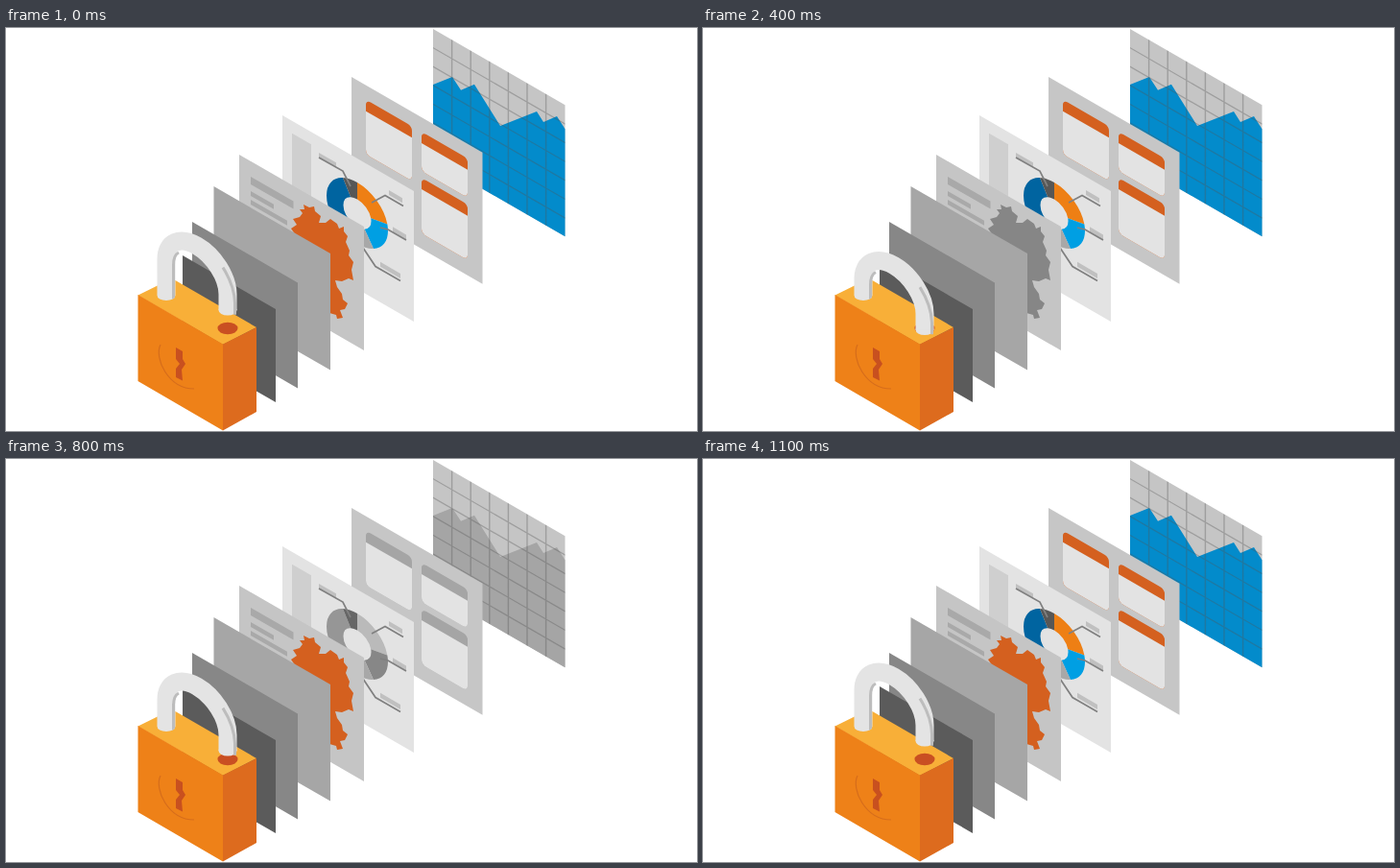
Recreate the animation shown at these times as an HTML page. Size 720 by 420 pixels, loop 1.3 s.

```html
<!DOCTYPE html>
<html lang="en">
<head>
<meta charset="utf-8">
<title>Padlock and layers</title>
<style>
html, body { margin: 0; width: 100%; height: 100%; overflow: hidden; background: #fff; }
svg { display: block; width: 720px; height: 420px; }
.accent { fill: #d4601f; }
.area { fill: #038bcb; }
.ring circle { fill: none; stroke-width: 17.5; }
.navy { stroke: #0064a0; }
.dark { stroke: #575756; }
.orange { stroke: #ee7f14; }
.sky { stroke: #009fe3; }
.pale { stroke: #a8a8a8; }
.locked .accent, .locked .area { fill: #a5a5a5; }
.locked .land { fill: #868686; }
.locked .navy { stroke: #969696; }
.locked .dark { stroke: #666; }
.locked .orange { stroke: #bababa; }
.locked .sky { stroke: #878787; }
.bars { fill: #a9a9a9; }
.tube path { fill: none; vector-effect: non-scaling-stroke; }
</style>
</head>
<body>
<svg viewBox="0 0 720 420">
  <defs>
    <clipPath id="socket">
      <path d="M0 0H720V420H186V279H176.500A9.500 5 0 0 1 157.500 279H0Z"/>
    </clipPath>
  </defs>

  <g id="chart" transform="matrix(1 .577 0 1 445 1)">
    <rect width="137.500" height="137" fill="#c5c5c5"/>
    <path class="area" d="M0 58L20 38.500L29 47L43 33L70 60.600L108 23.700L115 30.600L129 16.600L137.500 25V137H0Z"/>
    <path id="grid" fill="none" stroke="#555" stroke-opacity=".35" stroke-width="1.400"/>
  </g>

  <g id="cards" transform="matrix(1 .577 0 1 360 51)">
    <rect width="136.500" height="137" fill="#c6c6c6"/>
  </g>

  <g id="report" transform="matrix(1 .577 0 1 288 91)">
    <rect width="137" height="136" fill="#e3e3e3"/>
    <rect x="10" y="13" width="20" height="117" fill="#cfcfcf"/>
    <g class="ring" id="ring" transform="translate(78 57) rotate(-90)"></g>
    <g fill="#c0c0c0">
      <rect x="38" y="17" width="18" height="5"/>
      <rect x="111" y="14" width="14" height="5"/>
      <rect x="115" y="50" width="14" height="5"/>
      <rect x="102" y="94" width="21" height="5"/>
    </g>
  </g>
  <path fill="none" stroke="#808080" stroke-width="1.700"
    d="M326 135L351 149L359 165M381 182L395 174.500L414 185.500M390 208L398 210L417 221M372 229L385 248.500L411 263.500"/>

  <g id="map">
    <g transform="matrix(1 .577 0 1 243 132)">
      <rect width="130" height="129" fill="#c5c5c5"/>
      <g class="bars">
        <rect x="12" y="16" width="44.500" height="8"/>
        <rect x="12" y="31" width="24" height="5"/>
        <rect x="12" y="40" width="38" height="5"/>
      </g>
    </g>
    <path class="accent land" d="M310 184L316 187L321 186L322 191L328 196L326 203L333 203L338 199L345 204L347 209L352 207L352 212L356 217L354 223L358 232L357 237L362 244L360 252L362 263L357 261L350 264L343 263L345 270L350 277L351 283L356 287L353 293L348 294L351 302L345 303L344 299L337 297L310 265L300 240L302 216L297 209L303 205L299 199L306 197L309 193L306 189L311 189Z"/>
  </g>

  <g id="sheets"></g>

  <path fill="#f8af38" d="M137.500 278.500L173 261L261 312L226 330Z"/>
  <path fill="#ee8118" d="M137.500 278L226 329.500V419.500L137.500 368Z"/>
  <path fill="#dd6b1e" d="M226 329.500L261 312V400L226 419.500Z"/>
  <ellipse cx="231" cy="313" rx="10.500" ry="6.200" fill="#c94f22"/>
  <path fill="none" stroke="#d66d1b" stroke-width="1.200" d="M161 330C154 344 169 376 196 376"/>
  <path fill="#c8501f" d="M177 333L184 337V345L187 350L183 356L184 367.500L177 364V355L181 350L177 345Z"/>

  <g clip-path="url(#socket)">
    <g id="shackle">
      <ellipse cx="231" cy="294" rx="9.500" ry="5.500" fill="#e4e4e4"/>
      <g class="tube" transform="matrix(1 .577 0 1 199 259)">
        <path stroke="#e4e4e4" stroke-width="19" d="M-32 75V0A32 32 0 0 1 32 0V16.500"/>
        <path stroke="#bdbdbd" stroke-width="3" d="M-24.500 75V2Q-24.500 -8 -19 -14M27 -25Q39 -13 39.500 5V17"/>
      </g>
    </g>
  </g>
</svg>
<script>
const $ = id => document.getElementById(id);
const add = (id, markup) => $(id).insertAdjacentHTML("beforeend", markup);

let grid = "";
for (let p = 19.6; p < 137; p += 19.6) grid += `M${p} 0V137M0 ${p}H137.5`;
$("grid").setAttribute("d", grid);

// x, y, height of each card
for (const [x, y, h] of [[15, 15, 57], [73, 15, 41], [73, 63, 58]]) {
  add("cards", `<g transform="translate(${x} ${y})">
    <rect class="accent" width="48" height="${h}" rx="5"/>
    <path fill="#e3e3e3" d="M0 12H48V${h - 5}a5 5 0 0 1 -5 5H5a5 5 0 0 1 -5 -5Z"/></g>`);
}

// clockwise from the top, in degrees
for (const [name, from, to] of [["orange", 0, 78], ["sky", 78, 148], ["pale", 148, 200], ["navy", 200, 332], ["dark", 332, 360]]) {
  add("ring", `<circle class="${name}" r="23.25" pathLength="360"
    stroke-dasharray="${to - from} 360" stroke-dashoffset="${-from}"/>`);
}

for (const [x, y, size, fill] of [[216.5, 165, 121.5, "#a6a6a6"], [194, 202, 110, "#878787"], [184, 237, 97, "#5b5b5b"]]) {
  add("sheets", `<rect width="${size}" height="${size}" fill="${fill}" transform="matrix(1 .577 0 1 ${x} ${y})"/>`);
}

const layers = ["map", "report", "cards", "chart"].map($);
const drops = [0, 0, 5.5, 10, 20.5, 20.5, 20.5, 20.5, 10, 5, 0, 0, 0];

function draw(now) {
  const step = Math.floor(now % 1300 / 100);
  $("shackle").setAttribute("transform", `translate(0 ${drops[step]})`);
  // each layer loses its colour one step after the one before it, for four steps
  layers.forEach((layer, i) => layer.classList.toggle("locked", step >= 4 + i && step < 8 + i));
}

const start = performance.now();
function tick() {
  draw(performance.now() - start);
  requestAnimationFrame(tick);
}
tick();
</script>
</body>
</html>
```
